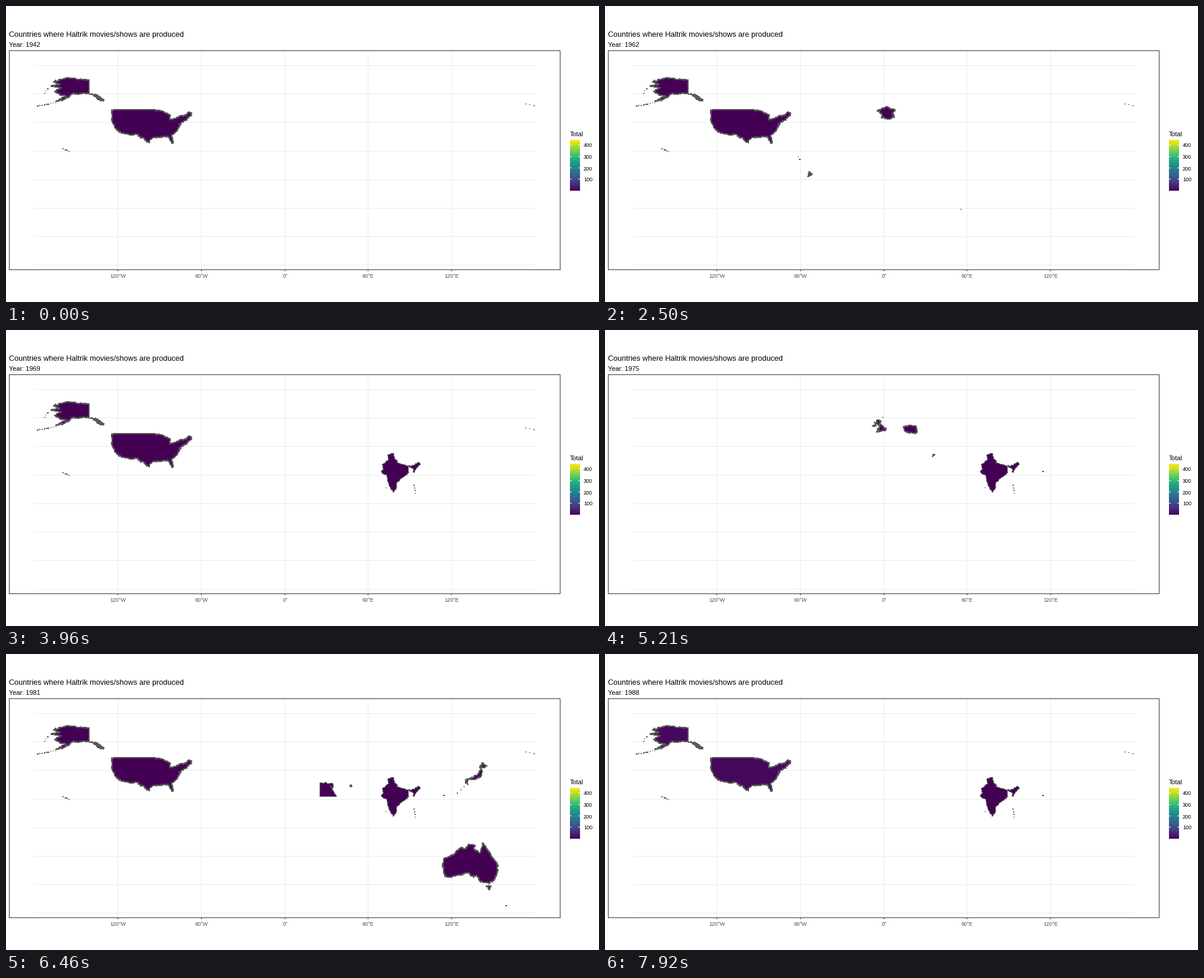
Animation of 1000 by 500 pixels, one loop 8000 ms. Source, as a matplotlib script:

```python
import numpy as np
import matplotlib.pyplot as plt
from matplotlib.animation import FuncAnimation
from matplotlib.collections import PolyCollection
from matplotlib.patches import Rectangle

W, H, DPI = 1000, 500, 100
PX = 72 / DPI                      # one pixel in points
LOOP, INTERVAL = 8000, 20
STEP = 625 / 3                     # time each year stays, in ms
COAST = "#595959"
BORDER = "#333333"
GRID = "#EBEBEB"
plt.rcParams["font.family"] = "Liberation Sans"
rng = np.random.default_rng(7)

GAPS = {*range(1948, 1954), 1957, 1961}
YEARS = [y for y in range(1942, 1989) if y not in GAPS]
NO_US = {1959, 1964, 1975}

fig = plt.figure(figsize=(W / DPI, H / DPI), dpi=DPI, facecolor="white")
ax = fig.add_axes([0, 0, 1, 1])


def project(lon, lat):
    return np.array([470.2 + 2.345 * lon, 293.3 - 2.411 * lat])


def coast(*corners):
    """Join a few (lon, lat) corners by ragged lines; long borders stay straight."""
    pts = [project(*c) for c in corners]
    out = []
    for a, b in zip(pts, pts[1:] + pts[:1]):
        length = np.hypot(*(b - a))
        n = 1 if length > 22 else max(1, int(length / 1.8))
        out.append(a)
        out += [a + (b - a) * i / n + rng.normal(0, 0.65, 2) for i in range(1, n)]
    return np.array(out)


def chain(start, end=None, n=1):
    """A row of n tiny islands from start to end."""
    out = []
    for t in np.linspace(0, 1, n):
        lon, lat = np.array(start) * (1 - t) + np.array(end or start) * t
        x, y = np.floor(project(lon, lat))
        w, h = rng.integers(2, 4), rng.integers(1, 3)
        out.append([(x, y), (x + w, y), (x + w, y + h), (x, y + h)])
    return out


class Country:
    def __init__(self, years, land=(), isles=()):
        self.years = set(years)
        self.land = self.add(land, linewidths=1.1 * PX, edgecolors=COAST)
        self.isles = self.add(isles, linewidths=0, facecolors=COAST)

    def add(self, polygons, **style):
        shape = PolyCollection(polygons, antialiaseds=False, zorder=3, **style)
        ax.add_collection(shape, autolim=False)
        return shape

    def show(self, year, color):
        for shape in (self.land, self.isles):
            shape.set_visible(year in self.years)
        self.land.set_facecolor(color)


def build_countries():
    lower_48 = coast(
        (-124.5, 48.6), (-122.8, 49), (-95.2, 49), (-88.4, 48.2), (-84, 46),
        (-82.3, 45.3), (-82.6, 42), (-79, 42.8), (-76.3, 43.9), (-75, 45),
        (-71.5, 45), (-69.2, 47.4), (-67.8, 47), (-67.2, 44.8), (-70.5, 43),
        (-70.3, 41.6), (-74, 40.5), (-76, 36.8), (-78, 33.9), (-81.3, 31),
        (-80.1, 26.2), (-81, 25.3), (-82.8, 28.5), (-84, 30.1), (-89.5, 29.8),
        (-94.5, 29.5), (-97.2, 27.6), (-97.3, 25.9), (-99.3, 26.5),
        (-102, 29.7), (-103.2, 29), (-106.5, 31.8), (-111, 31.3),
        (-117.1, 32.5), (-120.6, 34.6), (-124.3, 40.4), (-124, 46.2))
    alaska = coast(
        (-141, 69.7), (-150, 70.4), (-156.6, 71.4), (-161, 70.2),
        (-166.5, 68.4), (-161.7, 66.8), (-168, 65.7), (-161, 64.3),
        (-165.5, 62), (-162, 59.5), (-157.5, 58.6), (-164.8, 54.7),
        (-158, 56.4), (-152, 60.5), (-149.5, 59.8), (-145.5, 60.4), (-141, 60.2))
    panhandle = coast((-141, 60.2), (-135.5, 59.7), (-130, 56), (-130.4, 54.8),
                      (-133, 55.2), (-136.5, 58))
    us_isles = [panhandle, *chain((-178, 51.8), (-165, 54), 9),
                *chain((-173, 60.5), (-171, 63.6), 3),
                *chain((172.7, 53), (179, 51.8), 3),
                *chain((-159.6, 22), (-155.4, 19.8), 4),
                *chain((-76.3, 37.5), (-76.2, 39.3), 4)]
    britain = coast(
        (-5.4, 50.1), (1.3, 51), (1.7, 52.6), (0, 53.4), (-1.6, 55), (-3.2, 56),
        (-2, 57.6), (-3.5, 58.5), (-5.3, 58.3), (-5.5, 56), (-3.3, 54.9),
        (-3.2, 53.4), (-4.8, 52), (-3, 51.5))
    ulster = coast((-8, 54.5), (-6.5, 55.2), (-5.6, 54.4), (-7.3, 54.2))
    italy = coast(
        (7, 44), (7, 45.9), (12.3, 46.9), (13.5, 45.7), (12.4, 44.6), (14, 42.6),
        (18.4, 40.2), (16.6, 39.9), (16, 38), (15, 40.2), (12.2, 41.8),
        (10.2, 43.9))
    sicily = coast((12.5, 38), (15.5, 38.2), (15.1, 36.7))
    sardinia = coast((8.3, 40.8), (9.6, 41), (9.5, 39.2), (8.5, 39))
    egypt = coast((25, 31.5), (34.2, 31.3), (34.7, 29.5), (34.3, 27.8),
                  (32.6, 29.8), (35.5, 24), (36.9, 22), (25, 22))
    india = coast(
        (74, 34.5), (77.8, 35.5), (78.7, 31.5), (81, 30), (80.3, 28.7),
        (88.1, 26.6), (92, 27.2), (96, 29.3), (97.2, 28), (94.2, 24.5),
        (92.9, 22), (91.5, 25), (88.4, 26), (88.9, 21.8), (86.8, 20.5),
        (82.3, 16.7), (80.2, 15), (79.8, 10.3), (77.6, 8.1), (74.8, 13),
        (72.7, 20.5), (70.9, 20.8), (69, 22.8), (71, 24.4), (69.8, 27.5),
        (74.5, 31))
    poland = coast((14.2, 53.8), (18.5, 54.7), (23.4, 54), (24, 50.6),
                   (22.7, 49.2), (18.8, 49.6), (14.9, 51))
    lebanon = coast((35.1, 33.1), (36.5, 34.3), (36, 34.6))
    kuwait = coast((46.7, 29.1), (47.7, 30), (48.3, 28.6))
    hokkaido = coast((140, 42), (141.7, 45.4), (145.3, 43.4), (143.2, 42))
    honshu = coast((141, 41.3), (142, 39.6), (140.8, 35.6), (136, 33.7),
                   (131, 34), (136, 35.7), (138.6, 37.2), (140, 39.5))
    kyushu = coast((130, 33.5), (131.8, 33.4), (131.3, 31.4), (130.2, 31.2))
    australia = coast(
        (142.5, -10.8), (145.3, -15), (149, -20.4), (153.3, -26.5),
        (152.5, -32.3), (150, -37.3), (146.4, -38.9), (140.5, -38),
        (138, -33.6), (135.6, -34.8), (131.2, -31.5), (124, -33.5),
        (118, -34.9), (115.1, -34.3), (113.4, -25.5), (114.1, -22),
        (121.6, -18.8), (126.5, -14), (129.5, -15), (132, -11.5),
        (136.8, -12.2), (135.9, -15), (140.5, -17.6), (142.1, -11.5))
    tasmania = coast((144.7, -40.8), (148.3, -40.9), (146.9, -43.5))
    france = coast((-4.7, 48.4), (-1.8, 49.5), (2.5, 51.1), (8.2, 49),
                   (6.1, 46.3), (7.5, 43.8), (3.1, 42.4), (-1.7, 43.4),
                   (-1.2, 46))
    guiana = coast((-54.5, 2.3), (-54, 5.7), (-51.7, 4.1))
    argentina = coast(
        (-66, -21.8), (-57.7, -25.5), (-54, -26), (-58.4, -34), (-57.5, -38),
        (-62.2, -39), (-67.4, -46), (-65.8, -47.8), (-68.5, -52.2),
        (-65.2, -54.9), (-68.6, -54.9), (-73, -50), (-71, -40), (-70, -33))

    us = Country(set(YEARS) - NO_US, [lower_48, alaska], us_isles)
    others = [
        Country({1959, 1964, *range(1967, 1989)}, [india],
                chain((72.8, 11.2)) + chain((92.8, 13), (93.7, 7.4), 4)),
        Country({1944, 1965, 1971, 1975, 1979, 1982, 1983, 1986},
                [britain, ulster],
                chain((-7, 57.3), (-6, 55.5), 4) + chain((-1.3, 60.3))),
        Country({1954, 1956, 1958, 1981}, [egypt]),
        Country({1965}, [italy, sicily, sardinia]),
        Country({1962, 1973}, [france, guiana],
                chain((55.2, -20.9)) + chain((-61.5, 16.2), (-61, 14.6), 2)),
        Country({1971, 1972, 1975, 1978, 1980, 1981, 1988},
                isles=chain((114, 22.7))),
        Country({1975}, [poland, lebanon]),
        Country({1981}, [kuwait, hokkaido, honshu, kyushu],
                chain((131, 30.5), (124, 24.3), 4)),
        Country({1979, 1981, 1986}, [australia, tasmania],
                chain((158.7, -54.6))),
        Country({1985}, [argentina]),
    ]
    return us, others


def box(x, y, w, h, color, z=1):
    ax.add_patch(Rectangle((x, y), w, h, fc=color, lw=0, aa=False, zorder=z))


def label(x, y, text, size, color="black", ha="left"):
    return ax.text(x, y, text, size=size * PX, color=color, ha=ha,
                   va="baseline", zorder=6)


def draw_panel():
    for lat in range(-60, 81, 20):
        box(48, int(project(0, lat)[1]), 845, 1, GRID)
    for lon in range(-120, 121, 60):
        x = int(project(lon, 0)[0])
        side = "W" if lon < 0 else "E" if lon else ""
        box(x, 76, 1, 369, GRID)
        box(x, 446, 1, 2, BORDER)
        label(x + 0.5, 459, f"{abs(lon)}°{side}", 9, "#4D4D4D", "center")
    for y in (75, 445):
        box(5, y, 930, 1, BORDER, 5)
    for x in (5, 934):
        box(x, 75, 1, 371, BORDER, 5)
    label(5, 52, "Countries where Haltrik movies/shows are produced", 12.8)


def draw_legend():
    top, bottom = 226, 312
    label(951, 220, "Total", 10.8)
    ax.imshow(np.linspace(1, 0, bottom - top)[:, None], cmap="viridis",
              aspect="auto", extent=(951, 968, bottom, top),
              interpolation="nearest", zorder=2)
    for value in range(100, 401, 100):
        y = int(bottom - (value - 1) / 444 * (bottom - top))
        for x in (951, 965):
            box(x, y, 3, 1, "white", 3)
        label(974, y + 4.5, str(value), 9)


def fill(total):
    return plt.cm.viridis((total - 1) / 444)


draw_panel()
draw_legend()
us, others = build_countries()
year_text = label(5, 69, "", 11)
ax.set(xlim=(0, W), ylim=(H, 0))
ax.axis("off")


def update(i):
    year = YEARS[int((i + 0.5) * INTERVAL / STEP)]
    year_text.set_text(f"Year: {year}")
    us.show(year, fill(max(1, 1.4 * (year - 1980))))
    for country in others:
        country.show(year, fill(1))
    return []


anim = FuncAnimation(fig, update, frames=LOOP // INTERVAL, interval=INTERVAL,
                     repeat=True, repeat_delay=0, blit=False)
plt.show()
```
